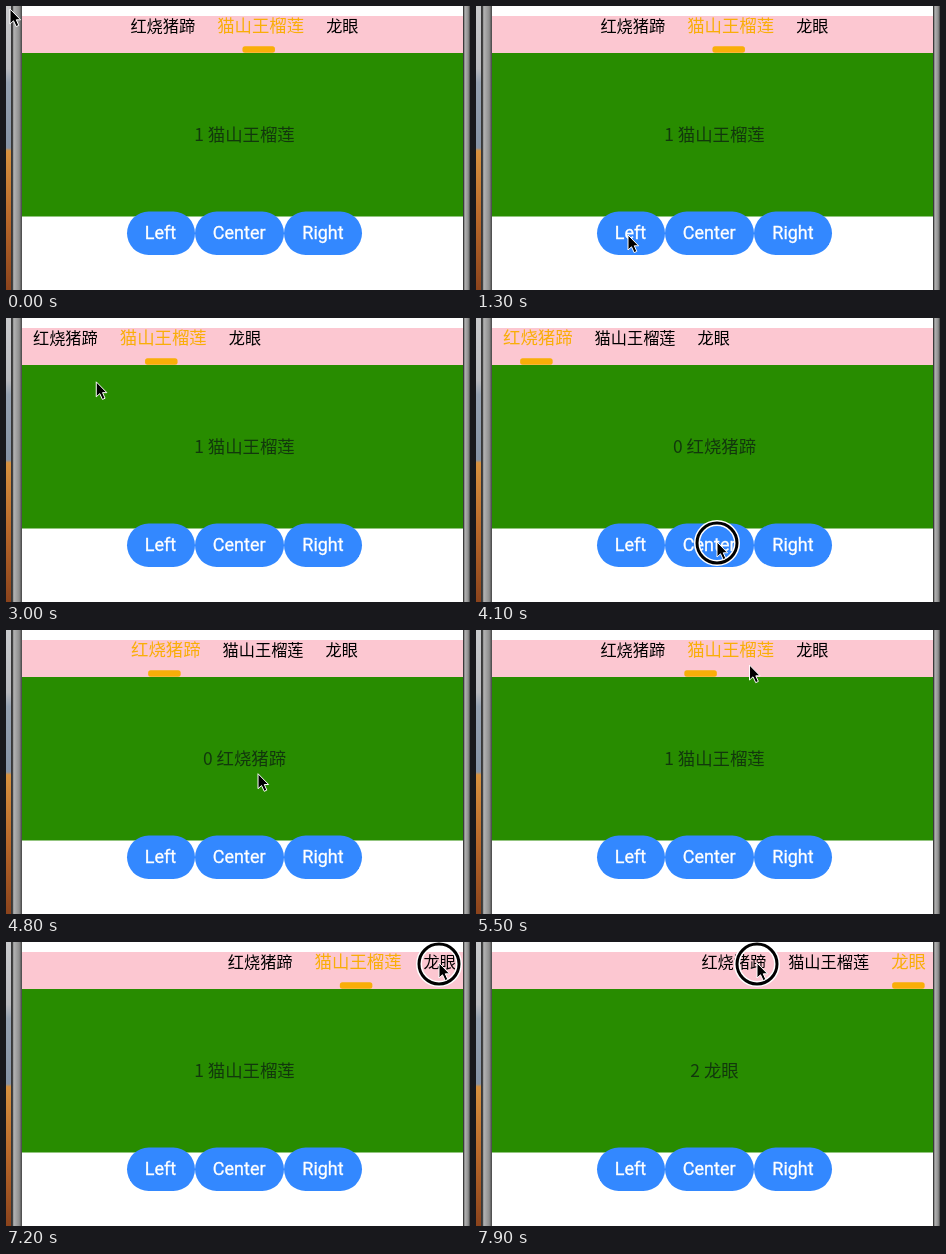
An HTML page for the animation above (8 s loop, 464 by 284 pixels).

```html
<!DOCTYPE html>
<html lang="zh-CN">
<head>
<meta charset="utf-8">
<style>
  html, body { margin: 0; width: 100%; height: 100%; overflow: hidden; background: #fff; }
  svg { display: block; width: 464px; height: 284px; }
  text { font-family: "Noto Sans CJK SC", "Noto Sans CJK", sans-serif; white-space: pre; }
  #tabs text { fill: #000; }
  #tabs text.on { fill: #f9ae08; }
  #page { font-size: 17.4px; fill: #12380c; text-anchor: middle; }
  .button rect { fill: #3388ff; }
  .button text { font: 400 18px Roboto, sans-serif; fill: #fff; stroke: #fff; stroke-width: .3; text-anchor: middle; }
</style>
</head>
<body>
<svg viewBox="0 0 464 284">
  <defs>
    <linearGradient id="desk" x2="0" y2="1">
      <stop offset="0" stop-color="#c9cacd"/>
      <stop offset=".22" stop-color="#b9babf"/>
      <stop offset=".27" stop-color="#96a2b2"/>
      <stop offset=".5" stop-color="#8794a6"/>
      <stop offset=".51" stop-color="#d8923f"/>
      <stop offset=".75" stop-color="#b9682a"/>
      <stop offset="1" stop-color="#8a431c"/>
    </linearGradient>
    <linearGradient id="metal">
      <stop offset="0" stop-color="#333"/>
      <stop offset=".15" stop-color="#444"/>
      <stop offset=".25" stop-color="#b4b4b4"/>
      <stop offset=".75" stop-color="#8e8e8e"/>
      <stop offset="1" stop-color="#444"/>
    </linearGradient>
  </defs>

  <rect width="464" height="284" fill="#fff"/>
  <rect width="6" height="284" fill="url(#desk)"/>
  <rect x="5" width="11" height="284" fill="url(#metal)"/>
  <rect x="457" width="7" height="284" fill="url(#metal)"/>

  <rect x="16" y="10" width="441" height="37" fill="#fcc7d1"/>
  <rect x="16" y="47" width="441" height="163.5" fill="#288c00"/>
  <g id="tabs">
    <text y="25.5">红烧猪蹄</text>
    <text y="25.5">猫山王榴莲</text>
    <text y="25.5">龙眼</text>
  </g>
  <rect id="bar" y="40.3" width="32.5" height="6.5" rx="2.5" fill="#f9ae08"/>
  <text id="page" x="238.5" y="135.3"></text>

  <g class="button"><rect x="121" y="205.5" width="68" height="43.5" rx="21.75"/><text x="154.5" y="233.3">Left</text></g>
  <g class="button"><rect x="189" y="205.5" width="89" height="43.5" rx="21.75"/><text x="233.2" y="233.3">Center</text></g>
  <g class="button"><rect x="278" y="205.5" width="78" height="43.5" rx="21.75"/><text x="317" y="233.3">Right</text></g>

  <g id="pointer">
    <g id="ring" fill="none">
      <circle cy="2" r="20" stroke="#fff" stroke-width="6"/>
      <circle cy="2" r="20" stroke="#000" stroke-width="3"/>
    </g>
    <path d="M0 1V16L3.5 12.8L6.2 18.6L8.8 17.4L6.3 11.8H10.6Z" fill="#000" stroke="#fff"/>
  </g>
</svg>
<script>
const LOOP = 8000, STEP = 100;
const PRESS = 200, SETTLE = 300;
const ROW_LEFT = 27, ROW_RIGHT = 450, GAP = 22;
const SIZE = 16.2, SIZE_ON = 17.4;

// Each stop of the pointer, and what pressing there sets
const stops = [
  { leave: 0, arrive: 900, x: 263, y: 14 },
  { leave: 900, arrive: 1300, x: 152, y: 228, press: 1600, align: 0 },
  { leave: 2500, arrive: 3200, x: 75, y: 22, press: 3200, select: 0 },
  { leave: 3400, arrive: 3800, x: 241, y: 223, press: 4000, align: 0.5 },
  { leave: 4500, arrive: 5200, x: 269, y: 19, press: 5200, select: 1 },
  { leave: 5400, arrive: 6000, x: 330, y: 222, press: 6000, align: 1 },
  { leave: 6500, arrive: 7200, x: 433, y: 20, press: 7200, select: 2 },
  { leave: 7400, arrive: 7800, x: 281, y: 20, press: 7900 }
];

const $ = id => document.getElementById(id);
const tabs = [...$('tabs').children];
const names = tabs.map(tab => tab.textContent);

const lerp = (a, b, p) => a + (b - a) * p;
const progress = (t, from, to) => Math.min(1, Math.max(0, (t - from) / (to - from)));
const easeOut = p => 1 - (1 - p) ** 3;
const easeInOut = p => p * p * (3 - 2 * p);

function pointerAt(t) {
  let x = 4, y = 2;
  for (const stop of stops) {
    const p = easeInOut(progress(t, stop.leave, stop.arrive));
    x = lerp(x, stop.x, p);
    y = lerp(y, stop.y, p);
  }
  return [x, y];
}

// Value of a pressed setting, eased in once the press is released
function settled(key, value, t) {
  for (const stop of stops) {
    if (!(key in stop)) continue;
    const released = stop.press + PRESS;
    value = lerp(value, stop[key], easeOut(progress(t, released, released + SETTLE)));
  }
  return value;
}

function layout(selected, align) {
  const sizes = names.map((_, i) => i === selected ? SIZE_ON : SIZE);
  const widths = names.map((name, i) => name.length * sizes[i]);
  const total = widths.reduce((sum, width) => sum + width + GAP, -GAP);
  let x = lerp(ROW_LEFT, ROW_RIGHT - total, align);
  return names.map((name, i) => {
    const tab = { x, size: sizes[i], center: x + name.length * SIZE / 2 + 1 };
    x += widths[i] + GAP;
    return tab;
  });
}

function draw(t) {
  const choice = stops.findLast(s => 'select' in s && t > s.press + PRESS);
  const selected = choice ? choice.select : 1;
  const row = layout(selected, settled('align', 0.5, t));
  tabs.forEach((tab, i) => {
    tab.setAttribute('x', row[i].x);
    tab.setAttribute('font-size', row[i].size);
    tab.setAttribute('class', i === selected ? 'on' : '');
  });

  const index = settled('select', 1, t);
  const before = Math.floor(index), after = Math.ceil(index);
  const center = lerp(row[before].center, row[after].center, index - before);
  $('bar').setAttribute('x', center - 16.25);
  $('page').textContent = `${selected} ${names[selected]}`;

  $('pointer').setAttribute('transform', `translate(${pointerAt(t)})`);
  const pressed = stops.some(s => t >= s.press && t < s.press + PRESS);
  $('ring').setAttribute('visibility', pressed ? 'visible' : 'hidden');
}

const start = performance.now();
function tick() {
  const t = (performance.now() - start) % LOOP;
  draw(Math.floor(t / STEP) * STEP);
  requestAnimationFrame(tick);
}
tick();
</script>
</body>
</html>
```
